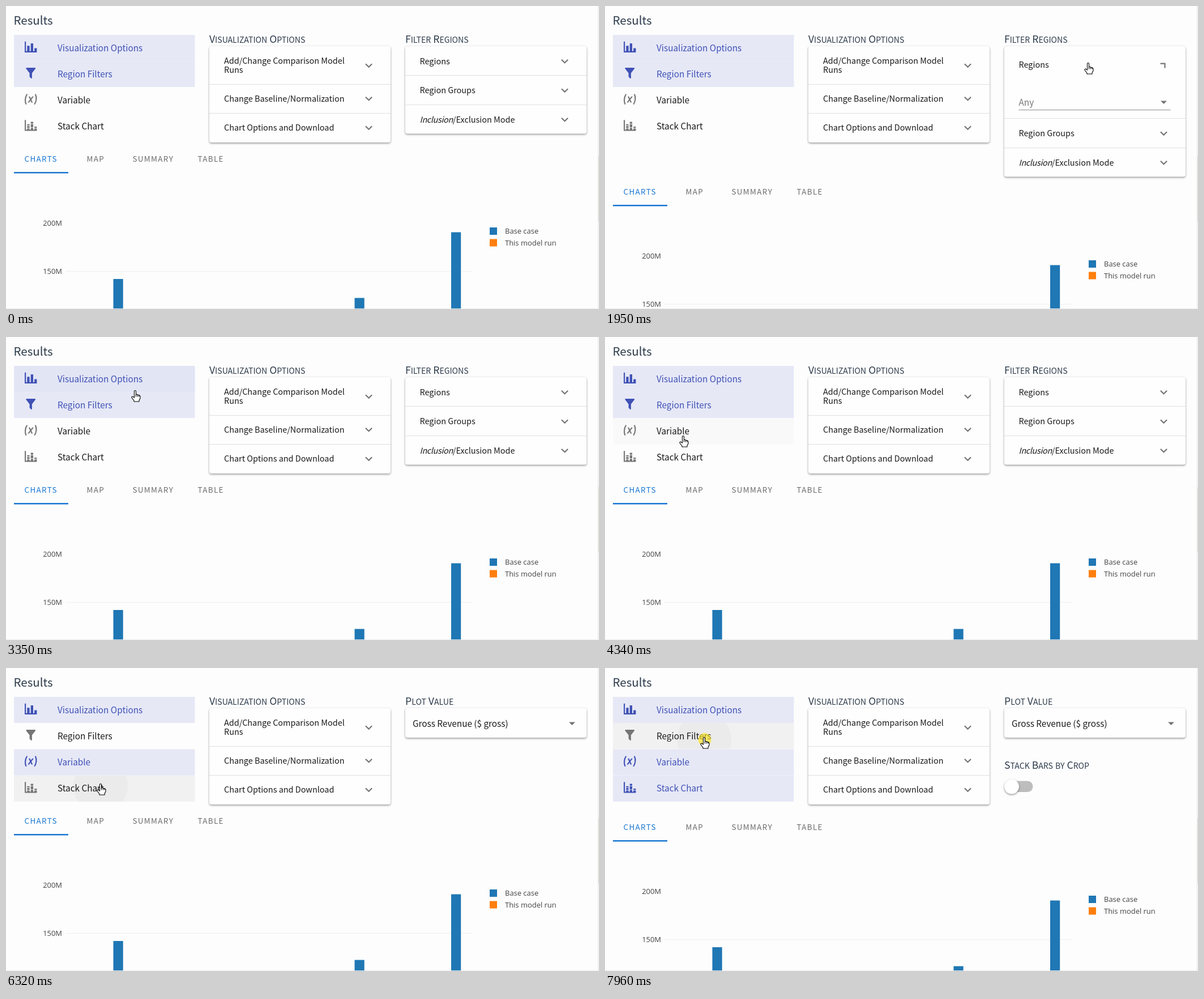
An HTML page with a canvas for the animation above (8000 ms loop, 1047x535 px).

```html
<!DOCTYPE html>
<html lang="en">
<head>
<meta charset="utf-8">
<title>Results panel</title>
<style>
html, body { margin: 0; width: 100%; height: 100%; overflow: hidden; background: #fdfdfd; }
canvas { display: block; }
</style>
</head>
<body>
<canvas id="stage" width="1047" height="535"></canvas>
<script>
const ctx = document.getElementById('stage').getContext('2d');
const SANS = '"Noto Sans CJK JP", "Noto Sans CJK SC", "Noto Sans CJK KR", sans-serif';
const OPEN = '"Open Sans", sans-serif';
const LOOP = 8000, PAGE = '#fdfdfd', INDIGO = '#3f51b5', GRAY = '#757575', INK = '#1a1a1a', BLUE = '#1976d2';

// Pointer tip: time, x, y
const PATH = [
  [410, 447, 448], [760, 438, 154], [920, 438, 154], [1260, 620, 76], [1670, 853, 100],
  [2350, 853, 100], [2520, 869, 96], [2700, 869, 96], [3180, 228, 94], [3350, 228, 94],
  [4100, 138, 153], [4250, 138, 174], [4600, 138, 174], [4930, 155, 130], [5010, 159, 113],
  [5350, 159, 113], [5750, 164, 196], [6070, 167, 204], [6600, 167, 204], [7070, 265, 290],
  [7300, 270, 349], [7880, 175, 122]
];
// Presses on list rows: time, row
const PRESSES = [[4440, 2], [5109, 1], [6310, 3], [7970, 1]];
const OPEN_AT = 1800, CLOSE_AT = 2560, FOCUS_TIME = 1000;
const ROWS = ['Visualization Options', 'Region Filters', 'Variable', 'Stack Chart'];
const ROW_HEIGHT = 46.2;
// Row icons on a 24 unit grid
const ICONS = [
  'M22 21H2V3H4V19H6V10H10V19H12V6H16V19H18V14H22Z',
  'M14 12V20Q14 21 13 21L10 18V12L4.2 4.6Q3.8 3.3 5 3H19Q20.2 3.3 19.8 4.6Z',
  'M20.4 3Q22.5 7 22 12 21.6 17 18.8 21L17.3 20Q19.7 16.4 20 12 20.5 7.7 18.7 4ZM5.2 3L6.7 4Q4.3 7.6 4 12 3.5 16.3 5.3 20L3.6 21Q1.5 17 2 12 2.4 7 5.2 3ZM12.1 10.7L14.4 7.4H16.9L13.1 12.4 15.3 17.4H13.1L11.7 14 9.3 17.4H6.8L10.7 12.2 8.5 7.4H10.8Z',
  'M22 21H2V3H4V19H6V17H10V19H12V16H16V19H18V17H22ZM18 14H22V16H18ZM12 6H16V9H12ZM12 10H16V15H12ZM6 10H10V12H6ZM6 13H10V16H6Z'
].map(d => new Path2D(d));

const progress = (t, start, length) => Math.min(1, Math.max(0, (t - start) / length));
const smooth = p => p * p * (3 - 2 * p);

function rect(x, y, w, h, color) {
  ctx.fillStyle = color;
  ctx.fillRect(x, y, w, h);
}
function pill(x, y, w, h, r, color) {
  ctx.fillStyle = color;
  ctx.beginPath();
  ctx.roundRect(x, y, w, h, r);
  ctx.fill();
}
const disc = (x, y, r, color) => pill(x - r, y - r, 2 * r, 2 * r, r, color);

function text(str, x, y, size, color = INK, { family = SANS, style = '', spacing = 0, align = 'left' } = {}) {
  ctx.font = `${style} ${size}px ${family}`;
  ctx.letterSpacing = spacing + 'px';
  ctx.textAlign = align;
  ctx.fillStyle = color;
  ctx.fillText(str, x, y);
  return x + ctx.measureText(str).width;
}
// Small caps: capitals large, the rest as smaller capitals
function heading(str, x, y) {
  for (const run of str.match(/[A-Z]|[a-z]+| /g))
    x = text(run.toUpperCase(), x, y, /[a-z]/.test(run) ? 14.1 : 17.6, '#2c3a4a');
}
function withShadow(draw) {
  ctx.save();
  ctx.shadowColor = 'rgba(0,0,0,.42)';
  ctx.shadowBlur = 3.5;
  ctx.shadowOffsetY = 1.5;
  draw();
  ctx.restore();
}
const card = (x, y, h) => withShadow(() => pill(x, y, 320, h, 4, '#fefefe'));

function chevron(x, y, turn = 0) {
  ctx.save();
  ctx.translate(x, y);
  ctx.rotate(-Math.PI * turn);
  ctx.strokeStyle = GRAY;
  ctx.lineWidth = 2.2;
  ctx.beginPath();
  ctx.moveTo(-5.6, -2.8);
  ctx.lineTo(0, 2.8);
  ctx.lineTo(5.6, -2.8);
  ctx.stroke();
  ctx.restore();
}
function dropArrow(x, y) {
  ctx.fillStyle = GRAY;
  ctx.beginPath();
  ctx.moveTo(x - 5.5, y - 2.5);
  ctx.lineTo(x + 5.5, y - 2.5);
  ctx.lineTo(x, y + 3);
  ctx.fill();
}

function pointerAt(t) {
  if (t < PATH[0][0]) return null;
  const i = PATH.findIndex(k => k[0] > t);
  if (i < 0) return PATH.at(-1).slice(1);
  const [t0, x0, y0] = PATH[i - 1], [t1, x1, y1] = PATH[i];
  const p = smooth((t - t0) / (t1 - t0));
  return [x0 + (x1 - x0) * p, y0 + (y1 - y0) * p];
}

const HAND = new Path2D('M-1.5 13V2Q-1.5.5 0 .5 1.5.5 1.5 2V7.5Q4.5 7 4.6 8.5 7 8 7.2 9.5 9 9.3 9 11V14L7 18V20H-2V18.5L-6 13Q-6.5 11-4.5 11Z');
const ARROW = new Path2D('M0 0V16L3.8 12.5 6.3 18.3 8.8 17.2 6.3 11.6H11.5Z');
function drawPointer([x, y], tabY) {
  const within = (l, top, r, b) => x >= l && x <= r && y >= top && y <= b;
  const hand = within(14, 51, 333, 236) || within(359, 71, 679, 241) ||
    within(705, 71, 1025, 226) || within(14, tabY - 24, 400, tabY + 24);
  const shape = hand ? HAND : ARROW;
  ctx.save();
  ctx.translate(x, y);
  ctx.fillStyle = '#fff';
  ctx.strokeStyle = '#000';
  ctx.lineWidth = 1.1;
  ctx.fill(shape);
  ctx.stroke(shape);
  if (hand) {
    ctx.beginPath();
    for (const bx of [1.5, 4.4, 7]) { ctx.moveTo(bx, 8); ctx.lineTo(bx, 11.5); }
    ctx.stroke();
  }
  ctx.restore();
}

function drawRow(i, t, on, pointer) {
  const y = 51 + ROW_HEIGHT * i, color = on ? INDIGO : INK;
  const fill = c => rect(14, y, 320, ROW_HEIGHT, c);
  const press = PRESSES.findLast(p => p[1] === i && t >= p[0] - 10);
  const age = press ? t - press[0] : Infinity;
  const pressed = age < 400, focused = age < FOCUS_TIME;
  const hover = pointer && pointer[0] > 14 && pointer[0] < 333 && pointer[1] >= y && pointer[1] < y + ROW_HEIGHT;

  ctx.save();
  ctx.beginPath();
  ctx.rect(14, Math.round(y), 319.5, Math.round(y + ROW_HEIGHT) - Math.round(y));
  ctx.clip();
  if (on) fill('#e6e8f6');
  if (focused && !on) fill('#f1f1f1');
  else if (focused && !hover) fill('rgba(63,81,181,.1)');
  else if (hover) fill(on ? 'rgba(63,81,181,.025)' : '#f9f9f9');
  if (pressed) {
    const grow = smooth(progress(age, 0, 225));
    const [px, py] = pointerAt(press[0]);
    ctx.globalAlpha = 1 - progress(age, 225, 150);
    disc(px + (173.5 - px) * grow, py + 4 + (y + 19 - py) * grow, 48 + 117 * grow,
      on ? 'rgba(63,81,181,.16)' : 'rgba(0,0,0,.022)');
  }
  ctx.restore();

  ctx.save();
  ctx.translate(30.9, y + 8.5);
  ctx.scale(1.07, 1.07);
  ctx.fillStyle = on ? INDIGO : GRAY;
  ctx.fill(ICONS[i]);
  ctx.restore();
  text(ROWS[i], 91, Math.round(y + 28.8), 15.3, color);
}

function drawOptions() {
  heading('Visualization Options', 359, 64.5);
  card(359, 71, 170);
  rect(359, 138, 320, 1, '#e0e0e0');
  rect(359, 189, 320, 1, '#e0e0e0');
  text('Add/Change Comparison Model', 385, 102, 14.43);
  text('Runs', 385, 118, 14.43);
  text('Change Baseline/Normalization', 385, 169, 14.43);
  text('Chart Options and Download', 385, 220, 14.43);
  [105, 163.5, 215].forEach(y => chevron(640.5, y));
}

function drawRegions(open, turn) {
  const grow = Math.round(77 * open), edge = 123 + grow, header = Math.round(6.2 * open);
  heading('Filter Regions', 705, 64.5);
  card(705, 71, 154.5 + grow);
  text('Regions', 730.5, 103 + header, 14.43);
  chevron(986.5, 97.5 + header, turn);
  if (open > 0) {
    ctx.save();
    ctx.beginPath();
    ctx.rect(705, 130, 320, Math.max(0, edge - 130));
    ctx.clip();
    text('Any', 730.5, 176, 15.3, GRAY);
    dropArrow(986.5, 170);
    rect(730.5, 183, 268, 1, '#8c8c8c');
    ctx.restore();
  }
  rect(705, edge - 1, 320, 1, '#e0e0e0');
  rect(705, edge + 51, 320, 1, '#e0e0e0');
  text('Region Groups', 730.5, 154 + grow, 14.43);
  chevron(986.5, 149 + grow);
  const x = text('Inclusion', 730.5, 206 + grow, 14.43, INK, { style: 'italic', spacing: -.35 });
  text('/Exclusion Mode', x, 206 + grow, 14.43);
  chevron(986.5, 200.5 + grow);
}

function drawPlotValue(x, y) {
  heading('Plot Value', x, y + 64.5);
  card(x, y + 71, 52);
  text('Gross Revenue ($ gross)', x + 13, y + 104, 15.3);
  dropArrow(x + 294.5, y + 98);
}

function drawSwitch() {
  heading('Stack Bars by Crop', 705, 177.5);
  pill(707, 199.5, 48.5, 19.5, 9.7, '#bdbdbd');
  withShadow(() => disc(718, 209.5, 13, '#fff'));
}

function drawChart(shift) {
  const label = (str, x, y, align) => text(str, x, y, 12.95, '#444', { family: OPEN, align });
  ctx.save();
  ctx.translate(0, shift);
  [['CHARTS', 33], ['MAP', 143], ['SUMMARY', 224], ['TABLE', 339]].forEach(([name, x], i) =>
    text(name, x - .5, 275, 13.43, i ? '#6c6c6c' : BLUE, { spacing: 1.34 }));
  rect(14, 293, 96, 2.5, BLUE);
  rect(105, 468, 719, 1, '#eee');
  label('200M', 99, 387.5, 'right');
  label('150M', 99, 473, 'right');
  [[189.5, 482], [615.5, 515.5], [786, 399.5]].forEach(([x, y]) => rect(x, y, 17.2, 300, '#1f77b4'));
  rect(854, 391, 13, 13, '#1f77b4');
  rect(854, 411.5, 13, 13, '#ff7f0e');
  label('Base case', 881, 402);
  label('This model run', 881, 422.7);
  ctx.restore();
}

function draw(t) {
  const up = progress(t, OPEN_AT, 180), down = progress(t, CLOSE_AT, 180);
  const open = 1 - (1 - up) ** 3 - down ** 1.65;
  const withVariable = t >= 4540, noRegions = t >= 5230, withStack = t >= 6460;
  const selected = [true, !noRegions, withVariable, withStack];
  const shift = withStack ? 11 : noRegions ? 0 : withVariable ? 139 : Math.round(Math.max(0, 77 * open - 18.3));
  const pointer = pointerAt(t);

  rect(0, 0, 1047, 535, PAGE);
  text('Results', 13.5, 32.7, 20.5, '#2c3a4a');
  ROWS.forEach((_, i) => drawRow(i, t, selected[i], pointer));
  drawOptions();
  if (noRegions) drawPlotValue(705, 0);
  else drawRegions(open, up - down);
  if (withVariable && !noRegions) drawPlotValue(14, 228);
  if (withStack) drawSwitch();
  drawChart(shift);
  rect(0, 534, 1045, 1, '#ebebeb');
  rect(1045, 0, 1, 535, '#e2e2e2');
  rect(1046, 265, 1, 115, '#eadfd4');

  if (!pointer) return;
  const clicked = [OPEN_AT, CLOSE_AT, ...PRESSES.map(p => p[0])].some(c => t > c - 100 && t < c);
  if (clicked) disc(pointer[0] + 1, pointer[1] + 4.5, 11.5, 'rgba(250,228,30,.65)');
  drawPointer(pointer, 270.5 + shift);
}

const STEP = 82.6, ANCHOR = 1770;
function frame() {
  const t = performance.now() % LOOP;
  draw(t < 410 ? 0 : ANCHOR + STEP * Math.floor((t - ANCHOR) / STEP + .1));
  requestAnimationFrame(frame);
}
frame();
</script>
</body>
</html>
```
